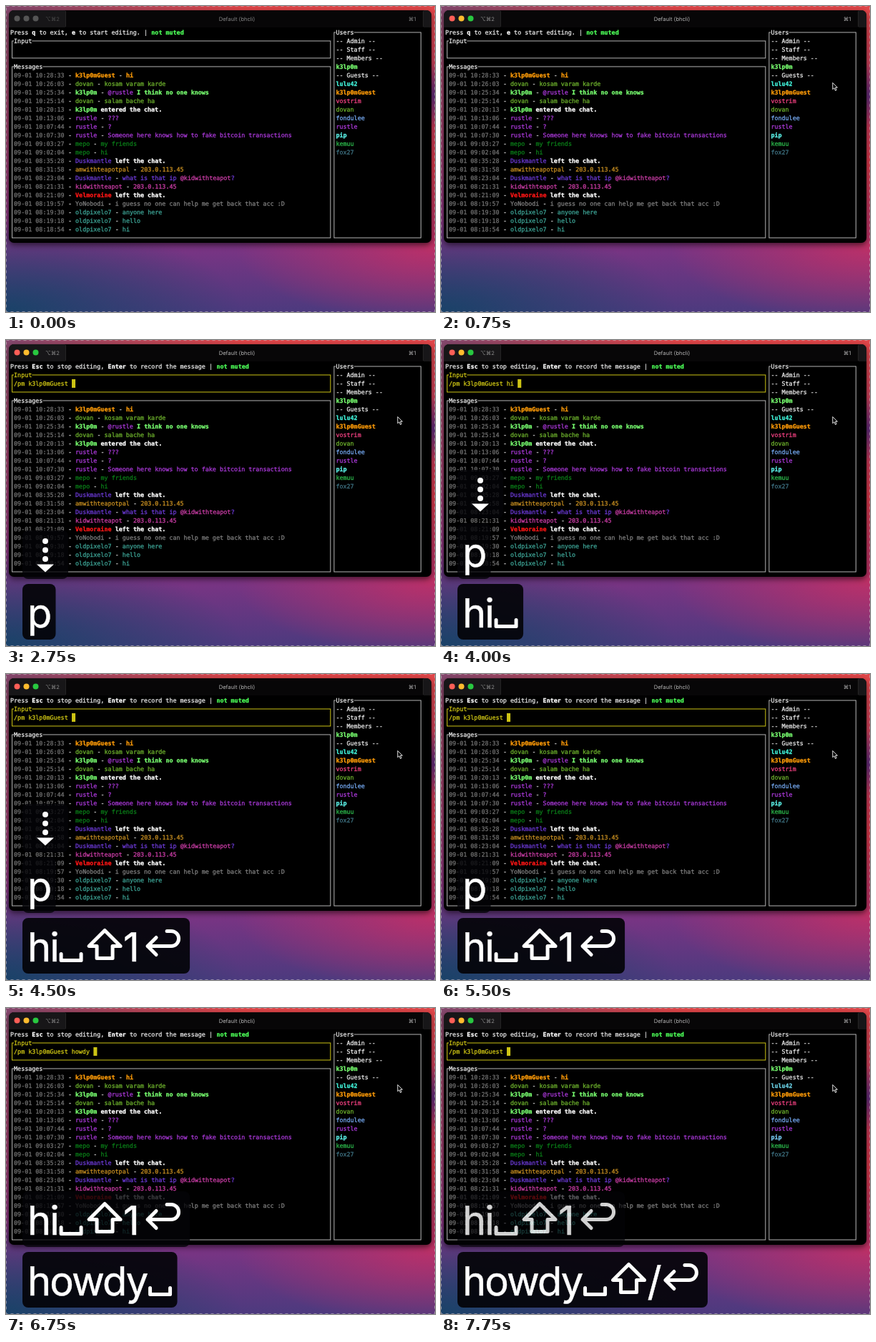
These frames come from a looping animation (600 by 429 pixels, 8000 ms). An HTML page:

```html
<!DOCTYPE html>
<html lang="en">
<head>
<meta charset="utf-8">
<title>Terminal chat</title>
<style>
html, body { margin: 0; width: 100%; height: 100%; overflow: hidden; }
body {
  background:
    radial-gradient(ellipse 40px 45px at 600px 125px, #5c2a78 0, #5c2a7800 100%),
    radial-gradient(ellipse 60px 130px at 600px 220px, #d83848 0, #d8384800 100%),
    radial-gradient(ellipse 280px 110px at 600px 335px, #bc3068 0, #bc306800 100%),
    radial-gradient(ellipse 330px 130px at 0 429px, #1a4268 0, #1a426800 100%),
    radial-gradient(ellipse 330px 300px at 0 0, #84486e 0, #84486e00 100%),
    linear-gradient(#e24648 0, #b83c68 35%, #7c3484 78%, #4c3a7e 100%);
}
svg { display: block; width: 600px; height: 429px; }
text { white-space: pre; text-rendering: geometricPrecision; }
.mono { font-family: "DejaVu Sans Mono", monospace; font-size: 8.4px; stroke-width: .3; }
.ui { font: 7.6px Inter, "DejaVu Sans", sans-serif; }
.key { font: 56px Inter, sans-serif; letter-spacing: -1.8px; fill: #fff; stroke: #fff; stroke-width: .5; }
.icon { fill: none; stroke: #fff; stroke-width: 5; stroke-linejoin: round; stroke-linecap: round; }
.window { filter: drop-shadow(0 3px 4px #0009); }
</style>
</head>
<body>
<svg viewBox="0 0 600 429">
  <text id="ruler" class="key" visibility="hidden"></text>
  <g id="desk"></g>
  <g id="live"></g>
</svg>
<script>
const LOOP = 8000, CELL = 5.06, ROW = 12;
const WHITE = '#e4e4e4', GRAY = '#6e6e6e', LINE = '#b4b4b4', YELLOW = '#cdc414', GREEN = '#4dff58';

const colors = {
  k3lp0mGuest: '#ff9c08', dovan: '#6cb02c', k3lp0m: '#78ff70', rustle: '#a838d6',
  mepo: '#0a7c18', Duskmantle: '#6c3ad6', amwithteapotpal: '#c48c20',
  kidwithteapot: '#c83ca4', Velmoraine: '#ff1616', YoNobodi: '#7c7c7c',
  oldpixelo7: '#3ca294', lulu42: '#40f0d8', vostrim: '#f04080',
  fondulee: '#74a8f0', pip: '#5cf4ea', kemuu: '#2cb84c', fox27: '#3e7282'
};
const bright = ['k3lp0mGuest', 'k3lp0m', 'Velmoraine', 'lulu42', 'pip'];

// Text starting with "*" is a system notice
const messages = [
  ['10:28:33', 'k3lp0mGuest', 'hi'],
  ['10:26:03', 'dovan', 'kosam varam karde'],
  ['10:25:34', 'k3lp0m', '@rustle I think no one knows'],
  ['10:25:14', 'dovan', 'salam bache ha'],
  ['10:20:13', 'k3lp0m', '*entered the chat.'],
  ['10:13:06', 'rustle', '???'],
  ['10:07:44', 'rustle', '?'],
  ['10:07:30', 'rustle', 'Someone here knows how to fake bitcoin transactions'],
  ['09:03:27', 'mepo', 'my friends'],
  ['09:02:04', 'mepo', 'hi'],
  ['08:35:28', 'Duskmantle', '*left the chat.'],
  ['08:31:58', 'amwithteapotpal', '203.0.113.45'],
  ['08:23:04', 'Duskmantle', 'what is that ip @kidwithteapot?'],
  ['08:21:31', 'kidwithteapot', '203.0.113.45'],
  ['08:21:09', 'Velmoraine', '*left the chat.'],
  ['08:19:57', 'YoNobodi', 'i guess no one can help me get back that acc :D'],
  ['08:19:30', 'oldpixelo7', 'anyone here'],
  ['08:19:18', 'oldpixelo7', 'hello'],
  ['08:18:54', 'oldpixelo7', 'hi']
];
const users = ['-- Admin --', '-- Staff --', '-- Members --', 'k3lp0m', '-- Guests --', 'lulu42',
  'k3lp0mGuest', 'vostrim', 'dovan', 'fondulee', 'rustle', 'pip', 'kemuu', 'fox27'];

const typed = [[2750, ''], [3500, 'hi'], [4000, 'hi '], [4250, 'hi !'], [4500, ''], [6000, 'how'],
  [6250, 'howd'], [6500, 'howdy'], [6750, 'howdy '], [7000, 'howdy ?'], [7250, '']];
const keyGroups = [
  { steps: [[1750, '↓']], fade: 5250, dim: .7 },
  { steps: [[2750, 'p']], fade: 6000, dim: .65 },
  { steps: [[3500, 'hi'], [4000, 'hi␣'], [4250, 'hi␣⇧1'], [4500, 'hi␣⇧1↵']], fade: 7750, dim: .82 },
  { steps: [[5750, 'h'], [6000, 'how'], [6250, 'howd'], [6500, 'howdy'], [6750, 'howdy␣'],
    [7000, 'howdy␣⇧/'], [7250, 'howdy␣⇧/↵']], fade: LOOP, dim: 1 }
];
// Each icon: advance and path, relative to the pen on the baseline
const icons = {
  '␣': [35, 'M4-11V-2H32V-11'],
  '⇧': [56, 'M30-44L8-22H19V-5H41V-22H52Z'],
  '↵': [59, 'M34-43H40A10.5 10.5 0 0 1 40-22H7M19-34L7-22L19-10']
};
const DIGIT = 27;

const last = (steps, t) => steps.filter(s => s[0] <= t).pop()?.[1];
const colX = c => 6 + c * CELL;
const rowY = r => 37 + r * ROW;
const rect = (x, y, w, h, fill, more = '') =>
  `<rect x="${x}" y="${y}" width="${w}" height="${h}" fill="${fill}" ${more}/>`;

function keyWidth(run) {
  if (icons[run]) return icons[run][0];
  if (/^\d$/.test(run)) return DIGIT;
  ruler.textContent = run;
  return ruler.getComputedTextLength();
}

// Parts are [text, color, bold]
function print(col, row, parts) {
  return parts.map(([s, color, bold]) => {
    const out = `<text class="mono" x="${colX(col)}" y="${rowY(row) + 3}" fill="${color}" stroke="${color}"` +
      `${bold ? ' font-weight="700"' : ''}>${s}</text>`;
    col += s.length;
    return out;
  }).join('');
}

function box(c0, r0, c1, r1, title, color, titleColor = color) {
  const x = colX(c0 + .5), y = rowY(r0);
  return rect(x, y, colX(c1 + .5) - x, rowY(r1) - y, 'none', `stroke="${color}"`) +
    rect(colX(c0 + 1), y - 5, title.length * CELL, 10, '#000') +
    print(c0 + 1, r0, [[title, titleColor]]);
}

function message([time, name, text], i, selected) {
  const color = colors[name], system = text[0] === '*', bold = bright.includes(name);
  const dash = selected ? '#3c6a3c' : '#d8d8d8';
  const ink = selected ? '#dca010' : color;
  const body = system ? [[' ' + text.slice(1), '#fff', true]] :
    [[' - ', dash], ...text.split(/(@\w+)/).filter(Boolean)
      .map(s => s[0] === '@' ? [s, colors[s.slice(1)]] : [s, ink, bold])];
  return (selected ? rect(11, 91, 440, 12, GREEN) : '') +
    print(1, 5 + i, [['09-01 ' + time, selected ? '#2c502c' : GRAY], [' - ', dash], [name, ink, bold], ...body]);
}

function userList(t) {
  const late = { lulu42: '#68cce0', pip: '#78ccf4' };
  return users.map((u, i) =>
    print(90, i + 1, [[u, (t >= 7500 && late[u]) || colors[u] || WHITE, bright.includes(u)]])).join('');
}

function titleBar(focused) {
  const lights = focused ? ['#ff5f57', '#febc2e', '#28c840'] : ['#555', '#555', '#555'];
  const ink = focused ? '#b4b4b4' : '#858585';
  const label = (x, s, fill) => `<text class="ui" x="${x}" y="20.5" text-anchor="middle" fill="${fill}">${s}</text>`;
  return lights.map((c, i) => `<circle cx="${15.5 + 13 * i}" cy="17.5" r="4" fill="${c}"/>`).join('') +
    label(65, '⌥⌘2', focused ? '#8a8a8a' : '#4c4c4c') + label(323, 'Default (bhcli)', ink) + label(568, '⌘1', ink);
}

function inputArea(t) {
  const muted = ['not muted', GREEN, true];
  if (t < 2750) {
    return print(0, 0, [['Press ', WHITE], ['q', '#fff', true], [' to exit, ', WHITE], ['e', '#fff', true],
      [' to start editing. | ', WHITE], muted]) + box(0, 1, 88, 3, 'Input', LINE, WHITE);
  }
  const line = '/pm k3lp0mGuest ' + last(typed, t);
  return print(0, 0, [['Press ', WHITE], ['Esc', '#fff', true], [' to stop editing, ', WHITE],
    ['Enter', '#fff', true], [' to record the message | ', WHITE], muted]) +
    box(0, 1, 88, 3, 'Input', YELLOW) + print(1, 2, [[line, YELLOW]]) +
    rect(colX(1 + line.length), 55, CELL, 12, YELLOW);
}

function keyPanel(keys, bottom, newest) {
  const arrow = keys === '↓', top = bottom - (arrow ? 68 : 78);
  let x = 30, marks = '';
  if (arrow) {
    marks = [15, 27.5, 40].map(d => `<circle cx="55" cy="${top + d}" r="4" fill="#fff"/>`).join('') +
      `<path d="M43 ${top + 47.5}h24l-12 11z" fill="#fff"/>`;
    x = 80;
  } else {
    for (const run of keys.match(/[␣⇧↵]|[^␣⇧↵]+/g)) {
      marks += icons[run] ? `<path class="icon" transform="translate(${x} ${bottom - 16.5})" d="${icons[run][1]}"/>`
        : `<text class="key" x="${x}" y="${bottom - 17}">${run}</text>`;
      x += keyWidth(run);
    }
  }
  return rect(23, top, x - 16, bottom - top, '#040408', `rx="8" fill-opacity="${newest ? .92 : .8}"`) + marks;
}

function keyStack(t) {
  let bottom = 420, out = '';
  const shown = keyGroups.filter(g => t >= g.steps[0][0] && t < g.fade + 250).reverse();
  shown.forEach((g, i) => {
    const keys = last(g.steps, t);
    out += `<g opacity="${t >= g.fade ? g.dim : 1}">${keyPanel(keys, bottom, i === 0)}</g>`;
    bottom -= (keys === '↓' ? 68 : 78) + 7;
  });
  return out;
}

const pointer = '<path d="M547.8 107.6v9.2l2.1-1.9 1.6 3.7 1.6-.7-1.6-3.6h2.9z" fill="#000" stroke="#fff" stroke-width=".9"/>';

desk.innerHTML =
  rect(.5, .5, 599, 428, 'none', 'stroke="#d0c4cc" stroke-opacity=".55" stroke-dasharray="4 4"') +
  rect(4, 6, 591, 326, '#000', 'class="window" rx="7"') +
  '<path d="M4 30V13a7 7 0 0 1 7-7H588a7 7 0 0 1 7 7V30z" fill="#171618"/>' +
  '<path d="M83 30V6H584V30z" fill="#070607"/><path d="M83.5 7V29M583.5 7V29" stroke="#242324"/>' +
  box(0, 4, 88, 24, 'Messages', LINE, WHITE) + box(89, 0, 113, 24, 'Users', LINE, WHITE);

function scene(t) {
  const picked = t >= 1750 && t < 2750;
  return titleBar(t >= 750) + inputArea(t) +
    messages.map((m, i) => message(m, i, picked && i === 0)).join('') +
    userList(t) + (t >= 500 ? pointer : '') + keyStack(t);
}

// Everything changes on quarter-second ticks
let shownTick = -1;
function frame() {
  const tick = Math.floor(performance.now() % LOOP / 250);
  if (tick !== shownTick) live.innerHTML = scene(tick * 250);
  shownTick = tick;
  requestAnimationFrame(frame);
}
frame();
</script>
</body>
</html>
```
